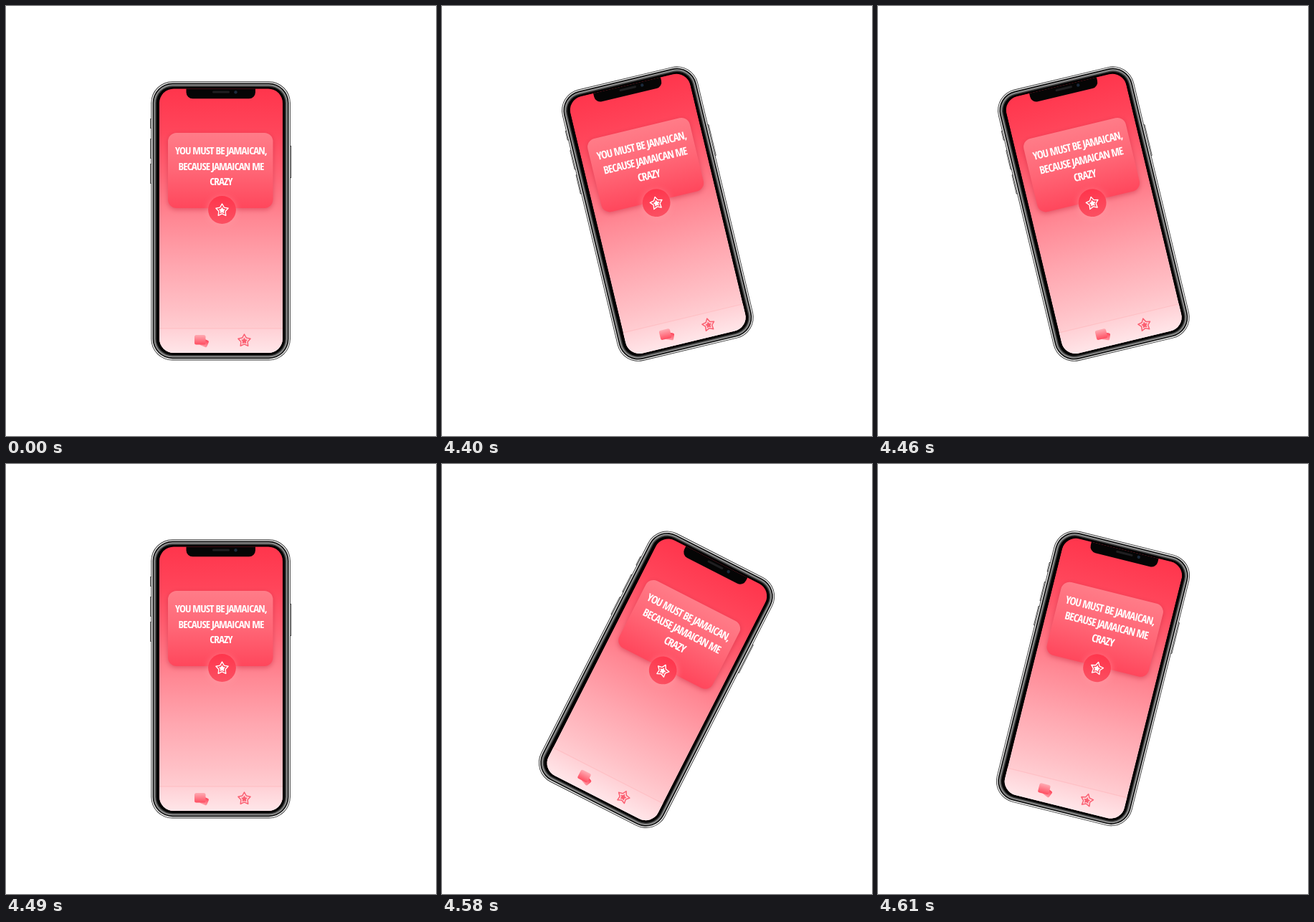
An HTML page with a canvas that plays this animation: 600 px wide and 600 px high, repeating every 4.64 s.

```html
<!DOCTYPE html>
<html lang="en">
<head>
<meta charset="utf-8">
<title>Shaking phone</title>
<style>
  html, body { margin: 0; width: 100%; height: 100%; overflow: hidden; background: #fff; }
  canvas { display: block; width: 600px; height: 600px; }
</style>
</head>
<body>
<canvas id="stage" width="600" height="600"></canvas>
<script>
const ctx = document.getElementById('stage').getContext('2d');
const LOOP = 4640;
const CENTER = 299.5;
const LINES = ['YOU MUST BE JAMAICAN,', 'BECAUSE JAMAICAN ME', 'CRAZY'];
const FACE = '"Open Sans Condensed", "Roboto Condensed", "Liberation Sans Narrow", "Open Sans", Roboto, sans-serif';

// Hard-cut poses: start time, tilt in degrees, centre
const POSES = [
  [0, 0, 299.5, 299.5],
  [4400, -13.5, 300.7, 289.7],
  [4430, -27, 299.4, 300.4],
  [4460, -13.5, 300.7, 289.7],
  [4490, 0, 299.5, 299.5],
  [4550, 14, 300, 298.8],
  [4580, 27, 299.6, 300.4],
  [4610, 14, 300, 298.8]
];

function box(x, y, w, h, r, fill) {
  ctx.beginPath();
  ctx.roundRect(x, y, w, h, r);
  ctx.fillStyle = fill;
  ctx.fill();
}

function fade(y0, y1, ...colors) {
  const g = ctx.createLinearGradient(0, y0, 0, y1);
  colors.forEach((c, i) => g.addColorStop(i / (colors.length - 1), c));
  return g;
}

function shadow(color, blur, dy = 0) {
  ctx.shadowColor = color;
  ctx.shadowBlur = blur;
  ctx.shadowOffsetY = dy;
}

function noShadow() {
  shadow('transparent', 0);
}

function starPath(x, y, r) {
  ctx.beginPath();
  for (let i = 0; i < 10; i++) {
    const a = i * Math.PI / 5 - Math.PI / 2;
    const d = i % 2 ? r * 0.54 : r;
    ctx.lineTo(x + d * Math.cos(a), y + d * Math.sin(a));
  }
  ctx.closePath();
}

function star(x, y, color, width) {
  ctx.lineJoin = 'round';
  ctx.lineWidth = width;
  ctx.strokeStyle = ctx.fillStyle = color;
  starPath(x, y, 9);
  ctx.stroke();
  starPath(x, y + 0.3, 4.8);
  ctx.fill();
}

function drawBody() {
  for (const y of [157, 185, 220]) {
    const h = y === 157 ? 14 : 28;
    box(201, y, 2.5, h, 1, '#444');
    box(201.8, y + 1, 1.5, h - 2, 0.5, '#ddd');
  }
  box(396, 195, 2.3, 45, 1, '#444');
  box(396, 196, 1.5, 43, 0.5, '#ddd');

  const layers = [
    [0, '#383838'], [0.9, '#f4f4f4'], [2.3, '#111'],
    [4, '#8c8c8c'], [6, '#3a3a3a'], [7.6, '#000']
  ];
  for (const [inset, color] of layers) {
    box(202.3 + inset, 105.3 + inset, 194.6 - 2 * inset, 389.2 - 2 * inset, 30 - inset, color);
  }
}

function drawNotch() {
  box(251.5, 112, 96.5, 17.3, [0, 0, 9, 9], '#050505');
  box(288, 118.6, 24, 3, 1.5, '#1f1f21');
  ctx.beginPath();
  ctx.arc(320.5, 120.2, 2.2, 0, 7);
  ctx.fillStyle = '#1b2a3c';
  ctx.fill();
}

function drawText() {
  const setFont = size => {
    ctx.font = `300 ${size}px ${FACE}`;
    ctx.fontStretch = 'condensed';
    ctx.letterSpacing = `${-0.06 * size}px`;
  };
  setFont(18);
  const widest = Math.max(...LINES.map(s => ctx.measureText(s).width));
  const size = Math.min(18, 18 * 128 / widest);
  setFont(size);
  ctx.textAlign = 'center';
  ctx.fillStyle = '#fff';
  LINES.forEach((s, i) => ctx.fillText(s, 300, 202 + i * 21.4 + size * 0.36));
}

function drawCard() {
  shadow('rgba(190,30,55,0.45)', 7, 2);
  box(226, 177, 146.5, 105, 12, fade(177, 282, '#ff7c88', '#ff6676', '#ff475c'));
  noShadow();
  drawText();

  shadow('rgba(255,150,160,0.8)', 10, 3);
  ctx.beginPath();
  ctx.arc(301.5, 284.5, 19.4, 0, 7);
  ctx.fillStyle = fade(265, 304, '#ff354c', '#fb5062');
  ctx.fill();
  noShadow();
  star(301.5, 285, '#fff', 1.4);
}

function drawNav() {
  box(214, 450, 172, 35, 0, fade(450, 484, '#ffd0d5', '#ffe6e9'));
  box(214, 449.3, 172, 1.2, 0, '#ffc0c5');

  ctx.save();
  ctx.translate(276.5, 470);
  ctx.rotate(0.4);
  box(-5.5, -5, 11, 10, 2, fade(-5, 5, '#ff4459', '#ff9aa5'));
  ctx.restore();
  box(263, 459, 15.5, 13.5, 2.5, fade(459, 473, '#ffabb3', '#ff4a5e'));
  star(332.5, 467, '#fb6072', 1.5);
}

function drawScreen() {
  ctx.save();
  ctx.beginPath();
  ctx.roundRect(214, 115.5, 172, 368.5, 20);
  ctx.clip();
  box(214, 115, 172, 370, 0, fade(115, 485,
    '#ff354c', '#ff465b', '#ff6475', '#ff8995', '#ffa6af', '#ffc0c6', '#ffdde0'));
  drawCard();
  drawNav();
  drawNotch();
  ctx.restore();
}

function render(time) {
  const t = time % LOOP;
  const [, tilt, x, y] = POSES.findLast(p => p[0] <= t);
  ctx.fillStyle = '#fff';
  ctx.fillRect(0, 0, 600, 600);
  ctx.save();
  ctx.translate(x, y);
  ctx.rotate(tilt * Math.PI / 180);
  ctx.translate(-CENTER, -CENTER);
  drawBody();
  drawScreen();
  ctx.restore();
}

const start = performance.now();
function tick() {
  render(performance.now() - start);
  requestAnimationFrame(tick);
}
tick();
</script>
</body>
</html>
```
